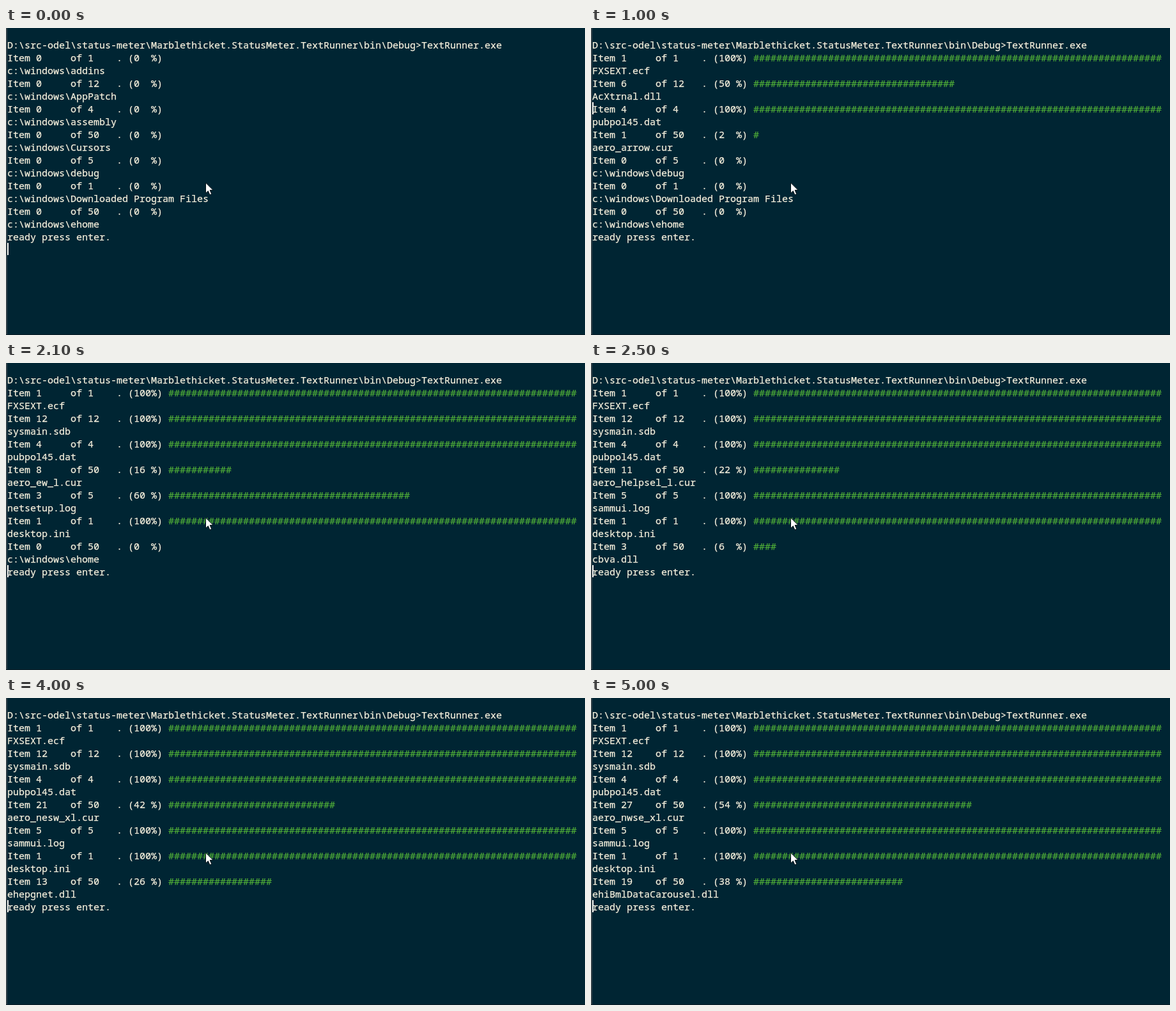
An HTML page that plays this animation: 906 px wide and 480 px high, repeating every 5100 ms.

```html
<!DOCTYPE html>
<html lang="en">
<head>
<meta charset="utf-8">
<title>Console</title>
<style>
  html, body {
    margin: 0;
    width: 100%;
    height: 100%;
    overflow: hidden;
    background: #002533;
  }
  #stage {
    position: absolute;
    left: 0;
    top: 0;
    width: 906px;
    height: 480px;
    overflow: hidden;
  }
  #stage::before {
    content: "";
    position: absolute;
    left: 0;
    top: 0;
    width: 2px;
    height: 480px;
    background: #34434a;
  }
  #stage::after {
    content: "";
    position: absolute;
    left: 0;
    bottom: 0;
    width: 906px;
    height: 1px;
    background: #0b1d27;
  }
  pre {
    position: absolute;
    left: 2px;
    top: 16px;
    margin: 0;
    font: 15px/20px "Noto Sans Mono", "DejaVu Sans Mono", monospace;
    color: #f8f1de;
    -webkit-text-stroke: 0.25px;
  }
  pre b { font-weight: 400; color: #4fac38; }
  #caret {
    position: absolute;
    left: 2px;
    width: 2px;
    height: 19px;
    background: #f4f4f0;
  }
  #pointer { position: absolute; left: 310px; top: 240px; }
</style>
</head>
<body>
<div id="stage">
  <pre id="text"></pre>
  <div id="caret"></div>
  <svg id="pointer" width="16" height="24" viewBox="-2.5 -2 16 24">
    <path d="M0 0V16.2L3.8 12.7L6.4 18.8L9.2 17.6L6.6 11.6H11.6Z" fill="#fff" stroke="#061419" stroke-width="1"/>
  </svg>
</div>
<script>
  const LOOP = 5100, FRAME = 100, TICK = 155, BAR = 71;
  const PROMPT = 'D:\\src-odel\\status-meter\\Marblethicket.StatusMeter.TextRunner\\bin\\Debug>TextRunner.exe';

  const withExt = (stems, ext) => stems.split(' ').map(s => `${s}.${ext}`);

  const cursorFiles = 'arrow busy ew helpsel link move nesw ns nwse'.split(' ').flatMap(kind =>
    ['', '_l', '_xl'].map(size => `aero_${kind}${size}.${kind === 'busy' ? 'ani' : 'cur'}`));

  // Each job handles one file per tick, beginning at its start time.
  const jobs = [
    { dir: 'addins', total: 1, start: 100, files: ['FXSEXT.ecf'] },
    { dir: 'AppPatch', total: 12, start: 100, files: [
      ...withExt('AcGenral AcLayers AcRes AcSpecfc acwow64 AcXtrnal apihex86', 'dll'),
      ...withExt('drvmain frxmain msimain pcamain sysmain', 'sdb')] },
    { dir: 'assembly', total: 4, start: 255, files: [
      'Desktop.ini', 'PublisherPolicy.tme', 'pubpol1.dat', 'pubpol45.dat'] },
    { dir: 'Cursors', total: 50, start: 875, files: cursorFiles },
    { dir: 'debug', total: 5, start: 1750, files: withExt('dcpromo mrt netsetup passwd sammui', 'log') },
    { dir: 'Downloaded Program Files', total: 1, start: 1960, files: ['desktop.ini'] },
    { dir: 'ehome', total: 50, start: 2115, files: [
      'audiodepthconverter.ax',
      ...withExt('BDATunePIA cbva ehchhime ehchsime ehcett ehcir ehcm ehcmres ehdrop ehepg ehepgdat ehepgnet ehepgres', 'dll'),
      'ehexthost.exe', 'ehexthost32.exe',
      ...withExt('ehglid ehiActivScp ehiBmlDataCarousel', 'dll')] }
  ];

  const textEl = document.getElementById('text');
  const caret = document.getElementById('caret');
  const pad = (value, width) => String(value).padEnd(width);
  const escapeHtml = s => s.replace(/>/g, '&gt;');

  function jobLines({ dir, total, start, files }, t) {
    const done = t < start ? 0 : Math.min(files.length, 1 + Math.floor((t - start) / TICK));
    const percent = Math.floor(done * 100 / total);
    const bar = '#'.repeat(Math.floor(done * BAR / total));
    const name = done ? files[done - 1] : 'c:\\windows\\' + dir;
    return `Item ${pad(done, 5)} of ${pad(total, 5)}. (${pad(percent, 3)}%) <b>${bar}</b>\n${name}`;
  }

  function caretRow(t) {
    if (t < 100) return 16;
    return t < 2000 ? 5 : 15;
  }

  let shown = -1;
  function draw() {
    const t = Math.floor(performance.now() % LOOP / FRAME) * FRAME;
    if (t !== shown) {
      shown = t;
      textEl.innerHTML = [
        escapeHtml(PROMPT),
        ...jobs.map(job => jobLines(job, t)),
        'ready press enter.'
      ].join('\n');
      caret.style.top = 16 + 20 * caretRow(t) + 'px';
    }
    requestAnimationFrame(draw);
  }
  draw();
</script>
</body>
</html>
```
